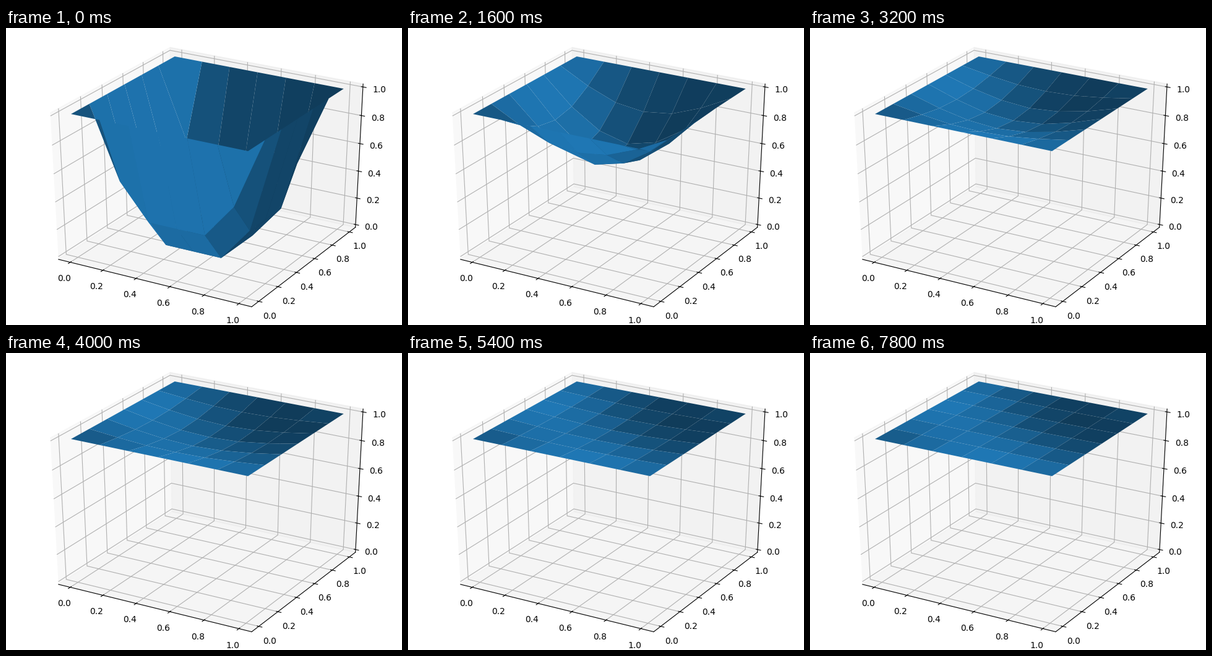
Recreate the animation shown at these times as a matplotlib script. Size 640 by 480 pixels, loop 8000 ms.

```python
import numpy as np
import matplotlib.pyplot as plt
from matplotlib.animation import FuncAnimation
from matplotlib.colors import to_rgb
from mpl_toolkits.mplot3d import Axes3D
from mpl_toolkits.mplot3d.art3d import Poly3DCollection

N = 7
FRAMES = 40
INTERVAL = 200
BASE = np.array(to_rgb("C0"))
LIGHT = np.array([-1, -1, 0.5])


class WideAxes(Axes3D):
    """3D axes that fill their rectangle instead of staying square."""

    def apply_aspect(self, position=None):
        pass


def relax(z):
    """One Jacobi step of the Laplace equation with a fixed border."""
    out = z.copy()
    out[1:-1, 1:-1] = (z[:-2, 1:-1] + z[2:, 1:-1]
                       + z[1:-1, :-2] + z[1:-1, 2:]) / 4
    return out


def solve(steps):
    z = np.ones((N, N))
    z[1:-1, 1:-1] = 0
    states = []
    for _ in range(steps):
        z = relax(z)
        states.append(z)
    return states


X, Y = np.mgrid[0:1:N * 1j, 0:1:N * 1j]


def faces(z):
    """Closed quads, one per grid cell."""
    p = np.stack([X, Y, z], axis=-1)
    a, b, c, d = p[:-1, :-1], p[:-1, 1:], p[1:, 1:], p[1:, :-1]
    return np.stack([a, b, c, d, a], axis=2).reshape(-1, 5, 3)


def shade(quads):
    """Brightness from 0.5 to 1, stretched over the current slopes."""
    n = np.cross(quads[:, 0] - quads[:, 1], quads[:, 1] - quads[:, 3])
    s = n @ LIGHT / np.linalg.norm(n, axis=1)
    s = (s - s.min()) / (s.max() - s.min())
    return (0.5 + 0.5 * s)[:, None] * BASE


fig = plt.figure(figsize=(6.4, 4.8), dpi=100)
ax = WideAxes(fig, (0, 0, 1, 1), elev=30, azim=-60)
fig.add_axes(ax)

# unit cube, undoing the built-in scale factor
ax.set_box_aspect((1, 1, 1), zoom=np.sqrt(3) / 1.8294640721620434)

ticks = np.linspace(0, 1, 6)
ax.set_xticks(ticks)
ax.set_yticks(ticks)
ax.set_zticks(ticks)
ax.set_xlim(-0.05, 1.05, view_margin=1 / 48)
ax.set_ylim(-0.05, 1.05, view_margin=1 / 48)
ax.set_zlim(0, 1, view_margin=1 / 48)

states = solve(FRAMES)
first = faces(states[0])
surface = Poly3DCollection(first, facecolors=shade(first),
                           edgecolors="none", linewidths=0)
ax.add_collection3d(surface)


def update(i):
    quads = faces(states[i])
    surface.set_verts(quads)
    surface.set_facecolor(shade(quads))
    return [surface]


anim = FuncAnimation(fig, update, frames=FRAMES, interval=INTERVAL,
                     repeat=True, repeat_delay=0, blit=False)
plt.show()
```
